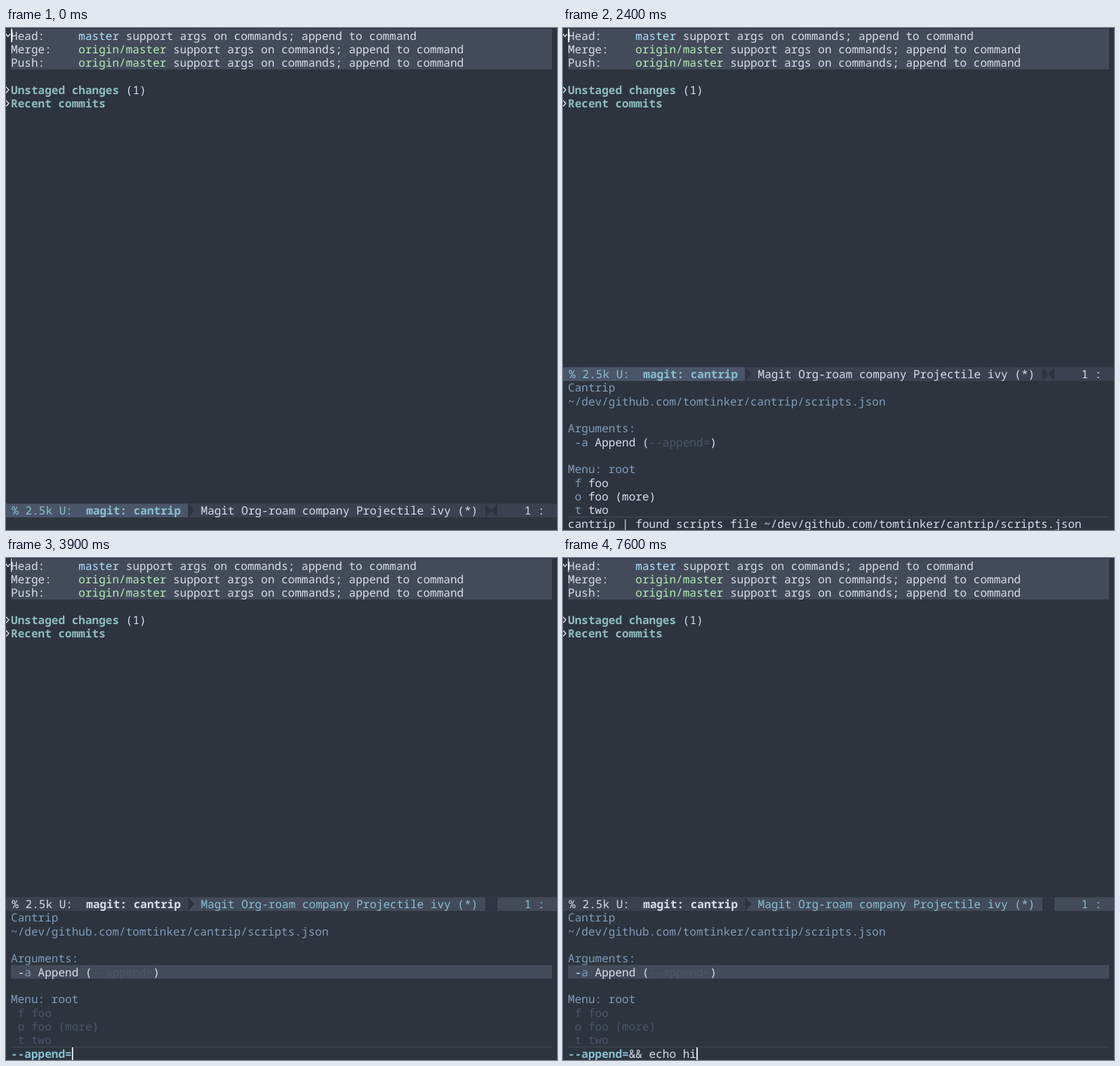
Animation of 785x714 px, one loop 8 s. Source, as an HTML page with a canvas:

```html
<!DOCTYPE html>
<html lang="en">
<head>
<meta charset="utf-8">
<title>Editor session</title>
<style>
html, body { margin: 0; width: 100%; height: 100%; overflow: hidden; background: #2d343e; }
canvas { display: block; }
</style>
</head>
<body>
<canvas id="stage" width="785" height="714"></canvas>
<script>
const ctx = document.getElementById('stage').getContext('2d');
const LOOP = 8000, CELL = 9.633, ROW = 19.3, LEFT = 7;
const FONT = '16.055px "Noto Sans Mono", monospace';
const C = {
  bg: '#2d343e', fg: '#d8dee9', raised: '#434a5a', bar: '#3b4150', barLit: '#4b556a',
  dim: '#4c566a', blue: '#7f9cba', cyan: '#88c0d0', teal: '#8fbcbb',
  local: '#b0e2ff', remote: '#b4eeb4', rule: '#444b53', gap: '#2f3641', cursor: '#ffffff'
};
const PATH = '~/dev/github.com/tomtinker/cantrip/scripts.json';

// Instants at which the blinking cursor toggles, starting from "on".
const TOP_BLINK = [500, 1100, 1500, 2100, 2900, 3300];
const INPUT_BLINK = [4400, 4900, 7200, 7500];
const TYPING = [
  [5400, '&'], [5500, '&&'], [5700, '&& '], [6200, '&& e'], [6400, '&& ech'],
  [6500, '&& echo'], [6700, '&& echo '], [7500, '&& echo h'], [7600, '&& echo hi']
];

const isOn = (times, t) => times.filter(x => t >= x).length % 2 === 0;

function rect(x, y, w, h, color) {
  ctx.fillStyle = color;
  ctx.fillRect(x, y, w, h);
}

function text(str, x, y, color = C.fg, bold = false) {
  ctx.font = (bold ? 'bold ' : '') + FONT;
  ctx.fillStyle = color;
  ctx.fillText(str, x, y);
}

// Each run is [string, color, bold]; runs follow each other on the cell grid.
function line(y, ...runs) {
  let col = 0;
  for (const [str, color, bold] of runs) {
    text(str, LEFT + col * CELL, y, color, bold);
    col += str.length;
  }
}

function triangle(x, tip, y, h) {
  ctx.fillStyle = C.bg;
  ctx.beginPath();
  ctx.moveTo(x, y);
  ctx.lineTo(tip, y + h / 2);
  ctx.lineTo(x, y + h);
  ctx.fill();
}

function chevron(...points) {
  ctx.strokeStyle = C.fg;
  ctx.lineWidth = 1.4;
  ctx.beginPath();
  for (const [x, y] of points) ctx.lineTo(x, y);
  ctx.stroke();
}

function drawStatus(t) {
  const y = row => 16.5 + row * ROW;
  const message = ' support args on commands; append to command';
  rect(LEFT, 1, 771, 3 * ROW, C.raised);
  line(y(0), ['Head:     '], ['master', C.local], [message]);
  line(y(1), ['Merge:    '], ['origin/master', C.remote], [message]);
  line(y(2), ['Push:     '], ['origin/master', C.remote], [message]);
  line(y(4), ['Unstaged changes', C.teal, true], [' (1)']);
  line(y(5), ['Recent commits', C.teal, true]);
  chevron([0, 8.5], [2.8, 12.2], [6, 8.5]);
  for (const mid of [88, 107.3]) chevron([0.3, mid - 4], [4, mid], [0.3, mid + 4]);
  if (isOn(TOP_BLINK, t)) rect(LEFT, 1, t < 3900 ? 2 : 1, 19, C.cursor);
}

function drawModeLine(y, active) {
  const h = 19.5, base = y + 15.5;
  const mid = active ? C.bar : C.raised;
  const sideText = active ? C.cyan : C.fg, midText = active ? C.fg : C.cyan;
  rect(0, y, 785, h, mid);
  rect(0, y, 259.5, h, active ? C.barLit : C.bar);
  triangle(259.5, 268.5, y, h);
  if (active) {
    triangle(683, 691.8, y, h);
    triangle(700, 691.2, y, h);
  } else {
    rect(683, y, 17, h, C.gap);
  }
  text('% 2.5k U:', 8.3, base, sideText);
  text('magit: cantrip', 114.3, base, sideText, true);
  text('Magit Org-roam company Projectile ivy (*)', 277.5, base, midText);
  text('1 :', 738.5, base, midText);
}

function drawMenu(t) {
  const locked = t >= 3600;
  const y = row => 517.4 + row * ROW;
  if (t >= 3900) rect(LEFT, 579, 771, ROW, C.raised);
  line(y(0), ['Cantrip', C.blue]);
  line(y(1), [PATH, C.blue]);
  line(y(3), ['Arguments:', C.blue]);
  line(y(4), [' '], ['-', locked ? C.fg : C.blue], ['a', C.blue], [' Append ('], ['--append=', C.dim], [')']);
  line(y(6), ['Menu: root', C.blue]);
  ['foo', 'foo (more)', 'two'].forEach((name, i) => {
    line(y(7 + i), [' ' + 'fot'[i] + ' ', locked ? C.dim : C.blue], [name, locked ? C.dim : C.fg]);
  });
  rect(LEFT, 695, 771, 1, C.rule);
}

function drawEcho(t) {
  const y = 711.3;
  if (t >= 2300 && t < 3600) line(y, ['cantrip | found scripts file ' + PATH]);
  if (t < 3900) return;
  const prompt = '--append=';
  const typed = TYPING.reduce((last, [at, str]) => t >= at ? str : last, '');
  line(y, [prompt, C.cyan, true], [typed]);
  if (isOn(INPUT_BLINK, t)) {
    rect(LEFT + (prompt.length + typed.length) * CELL + 0.2, 696, 1.7, 18, C.cursor);
  }
}

function draw(now) {
  const t = now % LOOP, menuOpen = t >= 2400;
  rect(0, 0, 785, 714, C.bg);
  drawStatus(t);
  drawModeLine(menuOpen ? 482.5 : 676.5, t < 3600);
  if (menuOpen) drawMenu(t);
  drawEcho(t);
}

ctx.textRendering = 'geometricPrecision';
const start = performance.now();
function tick() {
  draw(performance.now() - start);
  requestAnimationFrame(tick);
}
tick();
</script>
</body>
</html>
```
